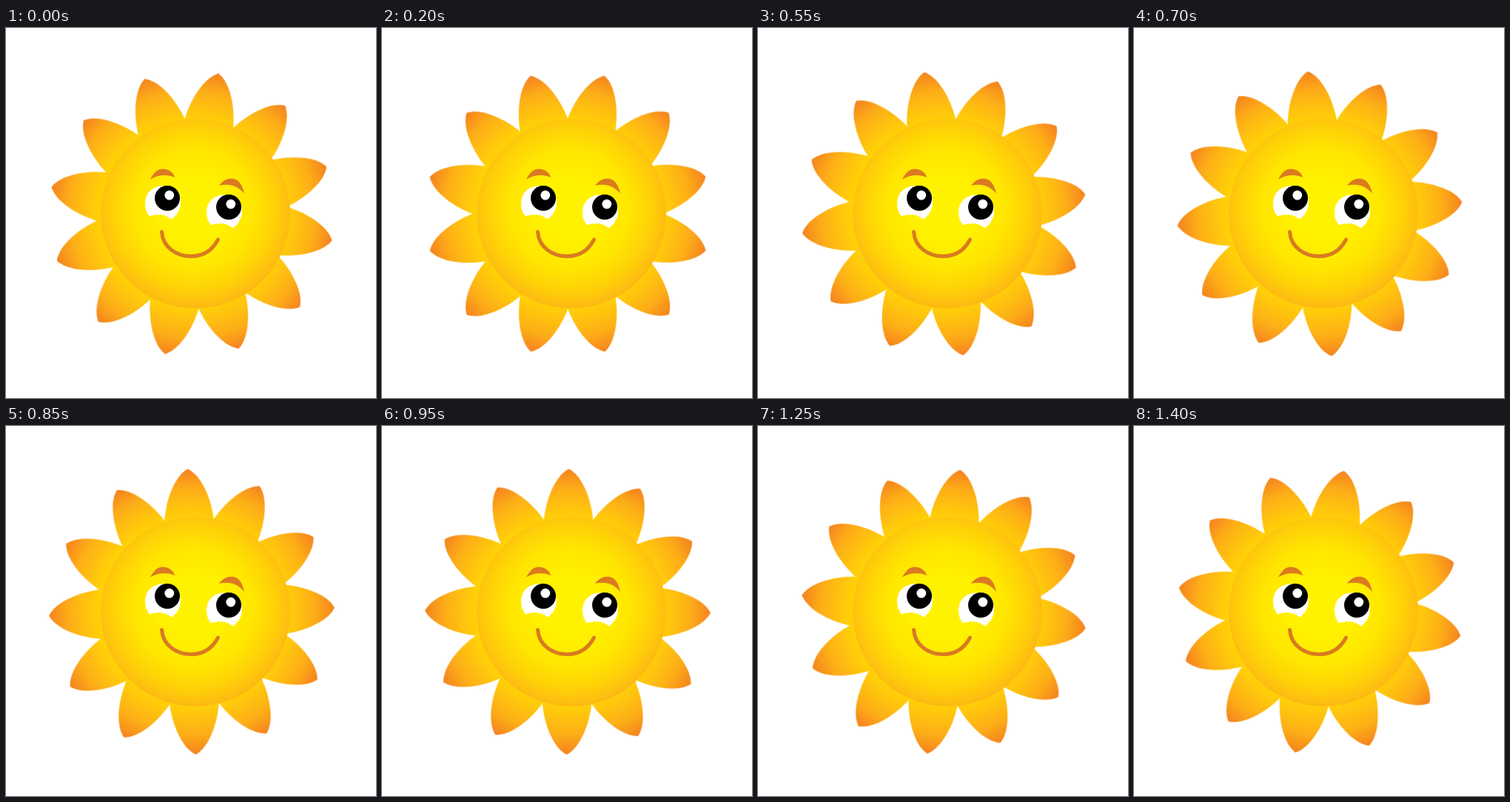
These frames come from a looping animation (500x500 px, 1450 ms). An HTML page:

```html
<!DOCTYPE html>
<html lang="en">
<head>
<meta charset="utf-8">
<title>Smiling sun</title>
<style>
html, body { margin: 0; width: 100%; height: 100%; overflow: hidden; background: #fff; }
svg { display: block; width: 100vw; height: 100vh; }
#rays { transform-origin: 0 0; }
</style>
</head>
<body>
<svg viewBox="0 0 500 500">
  <defs>
    <radialGradient id="rayFill" gradientUnits="userSpaceOnUse" cx="0" cy="0" r="195">
      <stop offset=".6" stop-color="#ffd800"/>
      <stop offset=".7" stop-color="#ffc80c"/>
      <stop offset=".85" stop-color="#fdae17"/>
      <stop offset="1" stop-color="#f47f20"/>
    </radialGradient>
    <radialGradient id="faceFill" gradientUnits="userSpaceOnUse" cx="254" cy="245" r="134">
      <stop offset=".3" stop-color="#fff200"/>
      <stop offset=".6" stop-color="#ffe600"/>
      <stop offset=".83" stop-color="#ffd008"/>
      <stop offset="1" stop-color="#fdb813"/>
    </radialGradient>
    <path id="ray" d="M0-193C18-184 31-152 33.500-122L0 0L-33.500-122C-31-152-18-184 0-193Z"/>
    <g id="eye">
      <path fill="#fff" d="M206 214C194 217 188 226 188 237C188 244 190 250 194 254.500C202 251 216 251 223.500 258.500C231 254 236 245 236 235C236 222 222 211 206 214Z"/>
      <circle cx="218" cy="230" r="17"/>
      <circle cx="220.800" cy="226" r="6.400" fill="#fff"/>
    </g>
  </defs>
  <g transform="translate(251 251)">
    <g id="rays" fill="url(#rayFill)"><circle r="124"/></g>
  </g>
  <circle cx="256" cy="251" r="128" fill="url(#faceFill)"/>
  <use href="#eye"/>
  <use href="#eye" x="83" y="12"/>
  <g fill="#db7a20">
    <path d="M195 204.500C200 194 206 190 213 190.500C221 191 226 196 228.500 202C219 197.500 206 197.500 195 204.500Z"/>
    <path d="M288 213C293 206 299 203 306 203.500C315 204.500 320 213 322 224C314 213 301 209.500 288 213Z"/>
  </g>
  <path d="M210.500 275.500C212 297 231 308.500 250 308.500C267 308.500 279 300 286.500 286" fill="none" stroke="#d97a20" stroke-width="5" stroke-linecap="round"/>
</svg>
<script>
const COUNT = 12, STEPS = 29, LOOP = 1450, START = 10.8;
const gap = 360 / COUNT;
const rays = document.getElementById('rays');

for (let i = 0; i < COUNT; i++) {
  const ray = document.createElementNS('http://www.w3.org/2000/svg', 'use');
  ray.setAttribute('href', '#ray');
  ray.setAttribute('transform', `rotate(${i * gap})`);
  rays.append(ray);
}

// One loop turns the rays by a single gap, so it repeats seamlessly.
rays.animate(
  [START, START + gap].map(a => ({ transform: `rotate(${a}deg)` })),
  { duration: LOOP, iterations: Infinity, easing: `steps(${STEPS})` }
);
</script>
</body>
</html>
```
